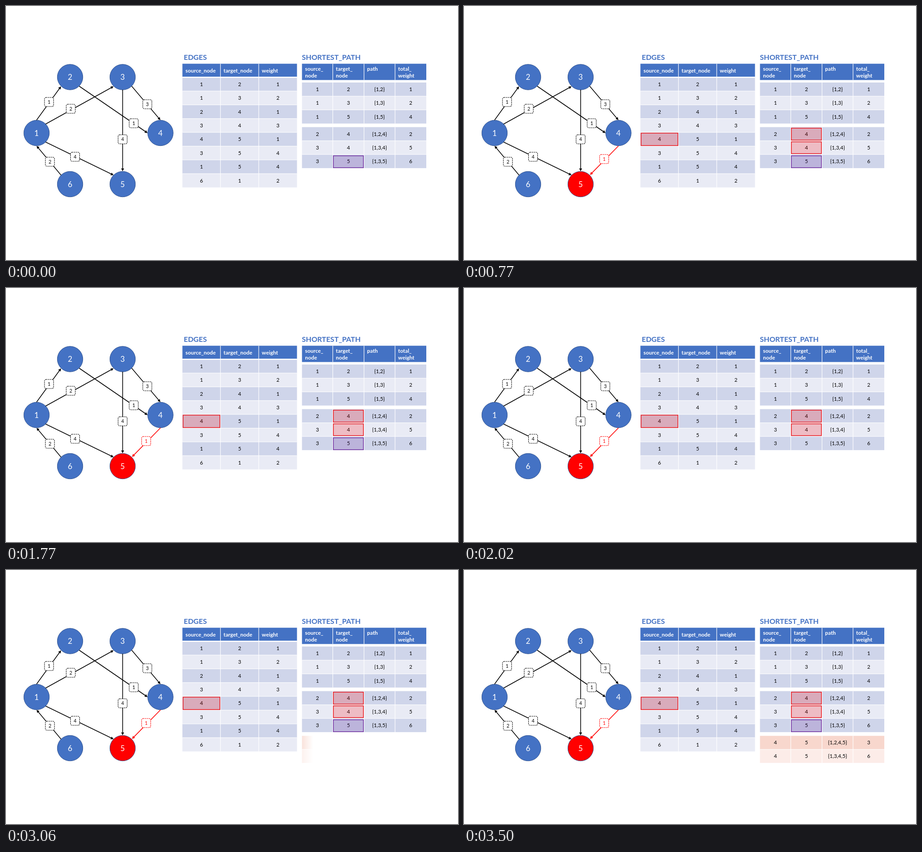
An HTML page with a canvas that plays this animation: 998x561 px, repeating every 5.05 s.

```html
<!DOCTYPE html>
<html lang="en">
<head>
<meta charset="utf-8">
<title>Shortest path</title>
<style>
html, body { margin: 0; width: 100%; height: 100%; overflow: hidden; background: #fff; }
canvas { display: block; width: 998px; height: 561px; }
</style>
</head>
<body>
<canvas id="stage"></canvas>
<script>
const W = 998, H = 561, LOOP = 5050, STEP = 40;
const canvas = document.getElementById('stage');
const dpr = window.devicePixelRatio || 1;
canvas.width = Math.round(W * dpr);
canvas.height = Math.round(H * dpr);
const ctx = canvas.getContext('2d');
ctx.scale(dpr, dpr);

const FONT = 'Lato, Carlito, sans-serif';
const BLUE = '#4472c4', RED = '#ff0000', PURPLE = '#7030a0';
const BLUE_ROWS = ['#cfd5ea', '#e9ebf5'];
const ORANGE_ROWS = ['#f8d7cd', '#fcece8'];
const ROW = 30.4;

const nodes = [[67.5, 280.5], [141.5, 157], [257.5, 157], [341, 280.5], [257.5, 393.5], [141.5, 393.5]];

// line start, line end, label centre, weight
const links = [
  [67.5, 252, 121.5, 177.5, 95, 212, 1],
  [87.5, 260.8, 237.5, 177.5, 143, 227, 2],
  [161.5, 177, 312.5, 280.5, 282, 259, 1],
  [277.5, 177, 341, 252, 312, 217, 3],
  [257.5, 185, 257.5, 365, 257.5, 294.5, 4],
  [87.5, 300.5, 237.5, 373.5, 152.5, 333, 4],
  [121.5, 373.5, 67.5, 309, 97, 344, 2]
];
const redLink = [341, 309, 278.3, 373, 309.5, 338, 1];

const edgeCols = [389.5, 473.5, 558, 642.5];
const pathCols = [653.5, 721.5, 790.5, 859, 928];
const edgeRows = ['1 2 1', '1 3 2', '2 4 1', '3 4 3', '4 5 1', '3 5 4', '1 5 4', '6 1 2'];
const firstRows = ['1 2 {1,2} 1', '1 3 {1,3} 2', '1 5 {1,5} 4'];
const secondRows = ['2 4 {1,2,4} 2', '3 4 {1,3,4} 5', '3 5 {1,3,5} 6'];
const newRows = ['4 5 {1,2,4,5} 3', '4 5 {1,3,4,5} 6'];

// y is the middle of the capitals
function text(str, x, y, size, color, align = 'center', weight = 400) {
  ctx.font = `${weight} ${size}px ${FONT}`;
  ctx.textAlign = align;
  ctx.fillStyle = color;
  ctx.fillText(str, x, y + size * 0.36);
}

function arrow([x1, y1, x2, y2], color) {
  const a = Math.atan2(y2 - y1, x2 - x1);
  const len = Math.hypot(x2 - x1, y2 - y1);
  ctx.save();
  ctx.translate(x1, y1);
  ctx.rotate(a);
  ctx.strokeStyle = ctx.fillStyle = color;
  ctx.lineWidth = 1.6;
  ctx.beginPath();
  ctx.moveTo(0, 0);
  ctx.lineTo(len - 4, 0);
  ctx.stroke();
  ctx.beginPath();
  ctx.moveTo(len, 0);
  ctx.lineTo(len - 6.2, -3.2);
  ctx.lineTo(len - 6.2, 3.2);
  ctx.fill();
  ctx.restore();
}

function label([, , , , x, y, weight], color) {
  ctx.beginPath();
  ctx.roundRect(x - 10, y - 10, 20, 20, 3.3);
  ctx.fillStyle = '#fff';
  ctx.fill();
  ctx.strokeStyle = color;
  ctx.lineWidth = 1.1;
  ctx.setLineDash([3, 1.2]);
  ctx.stroke();
  ctx.setLineDash([]);
  text(weight, x, y, 10.6, color);
}

function node(i, fill) {
  const [x, y] = nodes[i];
  ctx.beginPath();
  ctx.arc(x, y, 28.2, 0, Math.PI * 2);
  ctx.fillStyle = fill;
  ctx.fill();
  ctx.strokeStyle = '#2f528f';
  ctx.lineWidth = 1;
  ctx.stroke();
  text(i + 1, x, y + 0.3, 17, '#fff');
}

function band(cols, y, h, fill) {
  ctx.fillStyle = fill;
  ctx.fillRect(cols[0], y, cols[cols.length - 1] - cols[0], h);
}

function columnLines(cols, y, h) {
  ctx.fillStyle = '#fff';
  for (const x of cols.slice(1, -1)) ctx.fillRect(x - 0.6, y, 1.2, h);
}

function header(cols, y, h, heads, firstY) {
  band(cols, y, h, BLUE);
  columnLines(cols, y, h);
  heads.forEach((head, i) => head.split(' ').forEach((line, n) =>
    text(line, cols[i] + 6.8, firstY + n * 14.4, 11.8, '#fff', 'left', 700)));
}

function body(cols, y, rows, fills, rowH = ROW) {
  rows.forEach((row, r) => {
    const top = y + r * rowH;
    band(cols, top, rowH, fills[r % 2]);
    if (r) band(cols, top - 0.5, 1, '#fff');
    row.split(' ').forEach((cell, i) =>
      text(cell, (cols[i] + cols[i + 1]) / 2, top + rowH / 2, 11.6, '#000'));
  });
  columnLines(cols, y, rows.length * rowH);
}

function mark(x, y, w, h, fill, line) {
  ctx.globalAlpha = 0.2;
  ctx.fillStyle = fill;
  ctx.fillRect(x, y, w, h);
  ctx.globalAlpha = 1;
  ctx.strokeStyle = line;
  ctx.lineWidth = 1.5;
  ctx.strokeRect(x, y, w, h);
}

function redMark(x, y, w, h) {
  mark(x, y, w, h, RED, '#e8161d');
}

function mixToRed(p) {
  const c = [68 + 187 * p, 114 * (1 - p), 196 * (1 - p)].map(Math.round);
  return `rgb(${c})`;
}

// off for every even half period between start and end
function blinkOn(t, start, end, half) {
  return t < start || t >= end || Math.floor((t - start) / half) % 2 === 1;
}

// share of a half-second effect reached at t, in 40 ms steps
function progress(t, start, steps) {
  if (t < start) return 0;
  const k = Math.floor((t - start) / STEP) + 1;
  return k >= steps ? 1 : k * STEP / 500;
}

function wipeRows(p) {
  if (!p) return;
  body(pathCols, 366.3, newRows, ORANGE_ROWS, 29.9);
  if (p === 1) return;
  const left = pathCols[0], right = pathCols[4], soft = 35;
  const lead = left + p * (right - left + soft);
  const fade = ctx.createLinearGradient(lead - soft, 0, lead, 0);
  fade.addColorStop(0, 'rgba(255,255,255,0)');
  fade.addColorStop(1, '#fff');
  ctx.fillStyle = fade;
  ctx.fillRect(left - 1, 365, right - left + 2, 63);
}

function draw(t) {
  const redOn = t >= 40 && blinkOn(t, 520, 1270, 250);
  const purpleOn = t < 2520 ? blinkOn(t, 1520, 2520, 250) : t >= 2810;

  ctx.fillStyle = '#fff';
  ctx.fillRect(0, 0, W, H);

  const nodeFill = mixToRed(progress(t, 40, 13));
  nodes.forEach((_, i) => node(i, i === 4 ? nodeFill : BLUE));
  links.forEach(l => arrow(l, '#000'));
  links.forEach(l => label(l, '#000'));
  if (redOn) {
    arrow(redLink, RED);
    label(redLink, RED);
  }

  text('EDGES', 392.5, 113, 16, BLUE, 'left', 700);
  header(edgeCols, 127.5, 29, ['source_node', 'target_node', 'weight'], 142.3);
  body(edgeCols, 157.5, edgeRows, BLUE_ROWS);
  band(edgeCols, 156.3, 2.4, '#fff');

  text('SHORTEST_PATH', 653.3, 113.3, 16, BLUE, 'left', 700);
  header(pathCols, 127.5, 36, ['source_ node', 'target_ node', 'path', 'total_ weight'], 139);
  body(pathCols, 169, firstRows, BLUE_ROWS, 30.2);
  body(pathCols, 267.5, secondRows, BLUE_ROWS, 30.2);

  if (redOn) {
    redMark(391, 280.7, 81.3, 27.6);
    redMark(722.8, 269.7, 66.4, 26.6);
    redMark(722.8, 300, 66.4, 26);
  }
  if (purpleOn) mark(722.8, 330.8, 66.4, 26.4, PURPLE, PURPLE);

  wipeRows(progress(t, 3060, 12));
}

const start = performance.now();
function tick() {
  draw((performance.now() - start) % LOOP);
  requestAnimationFrame(tick);
}
tick();
</script>
</body>
</html>
```
